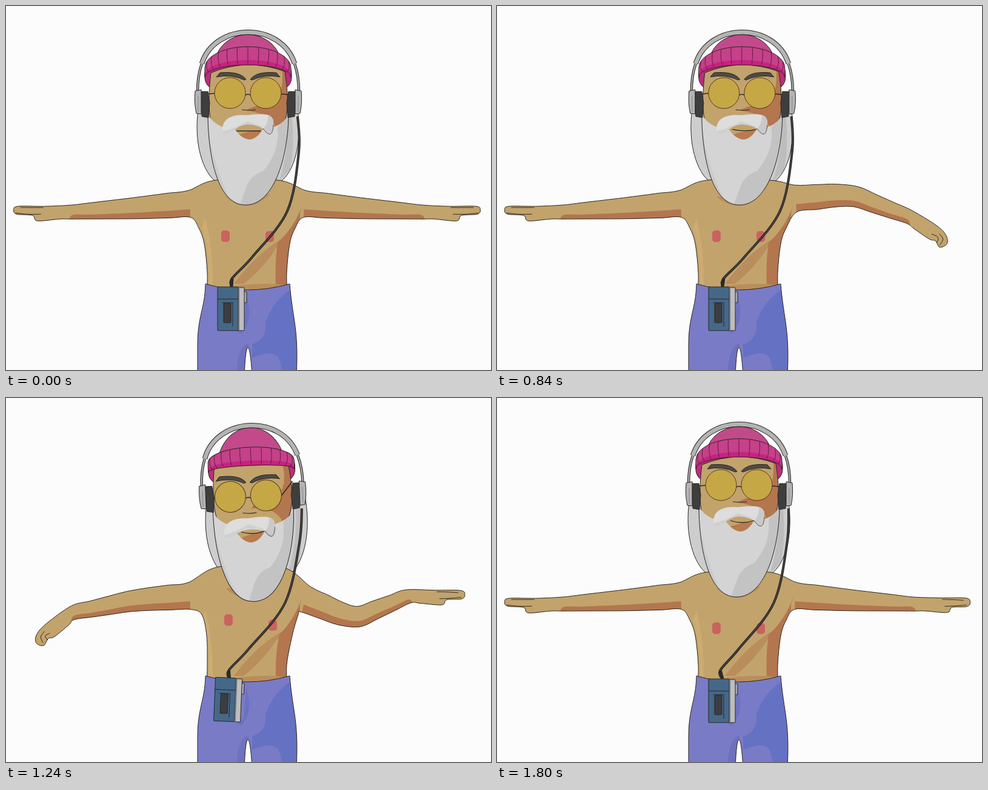
Animation, 800 px wide and 600 px high, one loop 1.88 s. Source, as an HTML page with a canvas:

```html
<!DOCTYPE html>
<html lang="en">
<head>
<meta charset="utf-8">
<title>Arm wave</title>
<style>
html, body { margin: 0; width: 100%; height: 100%; overflow: hidden; background: #fcfcfc; }
canvas { display: block; }
</style>
</head>
<body>
<canvas id="stage" width="800" height="600"></canvas>
<script>
const ctx = document.getElementById('stage').getContext('2d');
const INK = '#2b2622', SKIN = '#c2a36c', SHADE = '#b3764e', SOFT = '#b98d5c';
const LOOP = 1880, STEP = 40, LAST = 1800;
const BODY_AXIS = 397.5, HEAD_AXIS = 399.5, DEG = Math.PI / 180;
let t = 0;

// Timing: a smooth step between two times, and a smooth hill around one
function ramp(from, to) {
  const k = Math.max(0, Math.min(1, (t - from) / (to - from)));
  return k * k * (3 - 2 * k);
}
function bump(centre, reach) {
  const d = Math.abs(t - centre) / reach;
  return d < 1 ? Math.cos(d * Math.PI / 2) ** 2 : 0;
}
const mix = (a, b, k) => a + (b - a) * k;

// Drawing helpers
function line(path, color = INK, width = 1) {
  ctx.strokeStyle = color;
  ctx.lineWidth = width;
  ctx.stroke(new Path2D(path));
}
function shape(path, fill, outline = INK, shades = []) {
  path = new Path2D(path);
  ctx.fillStyle = fill;
  ctx.fill(path);
  ctx.save();
  ctx.clip(path);
  for (const [p, color] of shades) { ctx.fillStyle = color; ctx.fill(new Path2D(p)); }
  ctx.restore();
  if (outline) line(path, outline);
}
function box(x, y, w, h, fill, outline = INK, radius = 1) {
  const path = new Path2D();
  path.roundRect(x, y, w, h, radius);
  shape(path, fill, outline);
}
function within(x, y, draw, angle = 0, flip = 1) {
  ctx.save();
  ctx.translate(x, y);
  ctx.rotate(angle * DEG);
  ctx.scale(flip, 1);
  draw();
  ctx.restore();
}
function bothSides(draw) {
  draw();
  within(2 * HEAD_AXIS, 0, draw, 0, -1);
}
// Open smooth curve through points
function curve(pts) {
  const path = new Path2D(), at = i => pts[Math.max(0, Math.min(pts.length - 1, i))];
  path.moveTo(...pts[0]);
  for (let i = 0; i < pts.length - 1; i++) {
    const [p, a, b, n] = [at(i - 1), at(i), at(i + 1), at(i + 2)];
    path.bezierCurveTo(a[0] + (b[0] - p[0]) / 6, a[1] + (b[1] - p[1]) / 6,
      b[0] - (n[0] - a[0]) / 6, b[1] - (n[1] - a[1]) / 6, ...b);
  }
  return path;
}

const OPEN = [[44, -9], [88, -9], [95, -3], [90, 4], [64, 6], [56, 15], [20, 12]];
const FIST = [[44, -16], [66, -13], [76, -3], [70, 9], [58, 5], [48, 9], [18, 11]];

// One arm, built on the right-hand side of the stage
function buildArm({ raise, dip, curl, droop }) {
  const upper = (5 - 13 * raise + 18 * dip) * DEG;
  const fore = (4 + 15 * raise - 26 * dip + .19 * droop) * DEG;
  const reach = 1 - .07 * dip;
  const go = ([x, y], angle, d) => [x + Math.cos(angle) * d, y + Math.sin(angle) * d];
  const shoulder = [470 + 6 * dip, 322 - 8 * raise];
  const elbow = go(shoulder, upper, 113 * reach), wrist = go(elbow, fore, 105 * reach);
  // u runs 0..2 from shoulder to wrist, d is the distance below the bone
  const point = (u, d) => {
    const [a, b] = u < 1 ? [shoulder, elbow] : [elbow, wrist];
    const turn = mix(upper, fore, Math.max(0, Math.min(1, (u - .7) / .6)));
    return go([mix(a[0], b[0], u % 1 || +(u > 0)), mix(a[1], b[1], u % 1 || +(u > 0))], turn + Math.PI / 2, d);
  };
  const along = depth => Array.from({ length: 7 }, (_, i) => point(.2 + .3 * i, depth(.2 + .3 * i)));
  const place = (open, fist) => open.map(([x, y], i) => {
    const turned = go(wrist, droop * DEG, mix(x, fist[i][0], curl));
    return go(turned, (droop + 90) * DEG, mix(y, fist[i][1], curl));
  });
  const low = along(u => 26 - 7 * u).reverse();
  return {
    outline: [...along(u => 5 * u - 21), ...place(OPEN, FIST), ...low],
    shade: [...along(u => 12 - 3 * u), ...low.map(([x, y]) => [x, y + 10])],
    fingers: [place([[46, -7], [64, -7], [84, -7]], [[56, -8], [66, -5], [68, 6]]),
      place([[92, 2], [72, 4], [50, 4]], [[46, 0], [58, -2], [62, 7]])]
  };
}

function drawBody(cx, cy) {
  const mirror = pts => pts.map(([x, y]) => [2 * BODY_AXIS - x, y]);
  const right = buildArm({
    raise: bump(960, 310), dip: bump(1240, 280),
    curl: ramp(500, 640) - .9 * ramp(960, 1240), droop: 60 * bump(960, 290)
  });
  const left = buildArm({
    raise: bump(1520, 270), dip: 0,
    curl: .9 * bump(1240, 270), droop: 42 * bump(1240, 280) + 35 * bump(1520, 270)
  });
  const half = (arm, sway) => [[448 + sway, 287 + cy], ...arm.outline,
    [477 + sway, 366 + cy], [468 + sway * .8, 392], [463, 440], [464, 476]];
  const outline = [...mirror(half(left, -cx)).reverse(), ...half(right, cx)];
  const slant = cx * .6;
  shape(curve(outline), SKIN, INK, [
    ['M323 365Q336 400 334 470H341Q342 400 329 350Z', '#cdac72'],
    ['M362 314Q397 346 436 310Z', SOFT],
    [`M${472 + slant} 375Q420 398 376 458H392Q425 432 445 400Z`, SOFT],
    [`M490 325Q476 365 ${448 + slant} 390Q442 430 446 475H485V340Z`, SHADE],
    ['M375 462Q420 455 465 460V476H375Z', SOFT],
    [curve(right.shade), SHADE], [curve(mirror(left.shade)), SHADE]]);
  for (const f of [...right.fingers, ...left.fingers.map(mirror)]) line(curve(f));
  box(355 + cx, 370 + cy * 1.5, 14, 19, '#cb6260', null, 5);
  box(428 + cx, 371 + cy * .6, 14, 18, '#cb6260', null, 5);
}

function drawPants() {
  shape('M329 458C328 500 316 510 316 560V610H393Q395 563 399 563T406 610H479C483 530 473 520 468 458Q398 478 329 458Z',
    '#797bc6', INK, [
    ['M472 466Q440 485 428 522Q430 550 406 558V580Q440 565 450 580L458 610H490V466Z', '#6571c2'],
    ['M396 478Q410 515 388 540L378 535L392 530Z', '#6b72c1'],
    ['M380 610Q382 560 400 556V580L392 610Z', '#6d71be']]);
}

function drawPlayer() {
  box(392, 471, 5, 18, '#a9a9ab');
  box(382, 464, 11, 71, '#bdbdbf');
  box(349, 463, 34, 72, '#456889');
  line('M349 483H383M356 489H374V528');
  line('M384 464V535', '#6e7377', 2);
  box(359, 490, 12, 32, '#3b3d40');
}

function drawCable(head, player, swing) {
  const rest = [[481, 182], [483, 240], [464, 338], [406, 414], [373, 449], [372, 463]];
  const pts = rest.map(([x, y], i) => {
    const u = i / 5;
    return [x + mix(head, player, u) + swing * Math.sin(Math.PI * u), y];
  });
  line(curve(pts), '#262322', 4);
  line(curve(pts), '#55504c', 1.2);
  line(curve(pts.slice(-2)), '#2b2928', 5);
}

function drawHat(pitch) {
  const dome = new Path2D();
  dome.ellipse(399, 98 + pitch, 55, 51 + pitch, 0, Math.PI, 0);
  shape(dome, '#c24a8b');
  // folded brim: two arcs that flatten as the head nods
  const rim = (a, side, bend) => [399 + 71 * Math.sin(a), side - (bend - pitch) * Math.cos(a)];
  const top = a => rim(a, 102, 35), bottom = a => rim(a, 117, 20);
  const angles = Array.from({ length: 13 }, (_, i) => (i - 6) * Math.PI / 12);
  const brim = curve([...angles.map(top), ...angles.map(bottom).reverse(), top(angles[0])]);
  const fold = curve([...angles.map(a => rim(a, 113, 24)), ...angles.map(bottom).reverse()]);
  shape(brim, '#c54189', INK, [[fold, '#c6247f']]);
  for (let a = -1.25; a < 1.3; a += .25) {
    const [x, y] = top(a), [x2, y2] = bottom(a);
    line(`M${x} ${y}Q${x + 3 * Math.sin(a)} ${y + 16} ${x2 - 4 * Math.sin(a)} ${y2 - 2}`, '#6b1747');
  }
}

function drawFace(smirk, smile, turn, nod) {
  const rise = 4 * smirk;
  shape(`M378 204Q398 194 424 ${202 - rise}Q414 220 400 220Q388 218 378 204Z`, SKIN, null,
    [['M382 213Q400 205 428 204V222H390Z', '#b97a50']]);
  const corner = 206 - 4 * smile;
  line(`M${380 + 5 * smile} ${corner + smirk}Q404 ${206 + 3 * smile} ${420 + 4 * (smile + smirk)} ${corner - 1.2 * rise}`, INK, 1.3);
  // moustache, its right half lifted by the smirk
  const end = `441 ${196 - rise}C440 ${214 - 2 * rise} 434 ${216 - 2 * rise} 424 ${202 - rise}`;
  shape(`M357 207C356 185 372 178 398 180C420 ${178 - 22 * smirk} 444 ${174 - 12 * smirk} ${end}Q412 195 398 195Q384 196 373 208Q357 216 357 207Z`,
    '#dddddd', null, [
    [`M432 170Q434 195 424 ${202 - rise}L440 220H450V170Z`, '#c9c9c9'],
    ['M355 218V207Q375 203 398 190L424 199Z', '#d0d0d0']]);
  line(`M${end}`, '#55504c');
  line(`M389 ${171 - smirk}Q402 ${173 - 7 * smirk} 412 ${171 - smirk}`);
  // glasses
  line(`M344 144L${334 - turn} 145M454 145L${466 - turn} ${146 - 1.5 * nod}M395 147Q399 144 403 147`, INK, 1.5);
  for (const x of [369.5, 428.5]) box(x - 25.5, 118, 51, 51, '#c6a746', '#53391c', 25.5);
  // brows
  const brow = lift => shape(`M403 ${121 - .6 * lift}Q413 ${107 - lift} 446 ${110 - lift}L452 ${117 - lift}Q427 ${112 - .8 * lift} 406 ${122 - .6 * lift}Z`, '#4d4b49');
  brow(13 * smirk);
  within(2 * HEAD_AXIS, 0, () => brow(0), 0, -1);
}

function drawHead(smirk, smile, turn, nod) {
  box(328, 92, 143, 46, '#bd2c7d', INK, 20);
  shape('M338 110C332 160 334 200 350 212Q398 222 446 212C466 195 468 160 460 108Q398 85 338 110Z', SKIN, INK,
    [[`M${455 + turn} 100Q460 140 442 160Q410 163 396 ${172 + nod * .5}Q440 178 448 208H475V100Z`, SHADE]]);
  within(0, .35 * nod, () => {
    const edge = 'M333 178C333 235 345 328 395 328S466 240 466 178';
    shape(edge + 'Q456 205 399 206Q345 205 333 178Z', '#d4d4d4', null, [
      ['M470 175L448 200Q452 240 424 272Q402 280 396 300L385 330H440L470 240Z', '#c3c3c3'],
      ['M330 180Q340 260 368 315H330Z', '#cbcbcb']]);
    line(edge);
  });
  within(turn, nod, () => drawFace(smirk, smile, turn, nod));
  drawHat(.75 * nod);
  const band = 'M323 95C345 26 454 26 476 95';
  bothSides(() => {
    const rod = 'M323 95Q316 115 316 141';
    line(rod, INK, 4.5);
    line(rod, '#a4a4a4', 2.5);
  });
  line(band, INK, 8.5);
  line(band, '#b4b4b4', 6.5);
  bothSides(() => {
    shape('M322 141H333L336 160L334 184L323 182Z', '#3f3e3e');
    shape('M312 140L322 138V178L314 177Q310 160 312 140Z', '#b4b4b5');
    line('M317 148V174', '#8b8b8c');
  });
}

function draw() {
  const middle = bump(1240, 280), late = bump(1520, 280);
  const x = 7 * ramp(640, 960) - 21 * ramp(1240, 1520) + 14 * ramp(1520, 1800);
  const y = 2 * middle - 4 * bump(1400, 120), tilt = -2.3 * middle - 1.3 * late;
  const turn = -7 * middle - 5 * late, nod = 16 * middle;
  const smirk = ramp(80, 260) - ramp(400, 580), smile = ramp(640, 960);
  const player = -6 * bump(1420, 400);
  const swing = 7 * late - 7 * middle - 8 * ramp(1600, 1800);

  ctx.fillStyle = '#fcfcfc';
  ctx.fillRect(0, 0, 800, 600);
  within(x - turn, y, () => shape('M318 165C308 225 325 275 347 290H452C475 275 490 225 480 165Z',
    '#cdcdcd', INK, [['M462 165Q470 230 450 290L468 270Q478 230 470 165Z', '#bdbdbd']]));
  drawBody(5 * middle - 9 * late, -9 * middle);
  drawPants();
  within(398 + x, 150 + y, () => within(-398, -150, () => drawHead(smirk, smile, turn, nod)), tilt);
  drawCable(x, player, swing);
  within(366 + player, 463 - 2 * middle, () => within(-366, -463, drawPlayer), 2.4 * middle);
}

ctx.lineJoin = 'round';
function tick() {
  t = Math.min(LAST, Math.floor(performance.now() % LOOP / STEP) * STEP);
  draw();
  requestAnimationFrame(tick);
}
tick();
</script>
</body>
</html>
```
